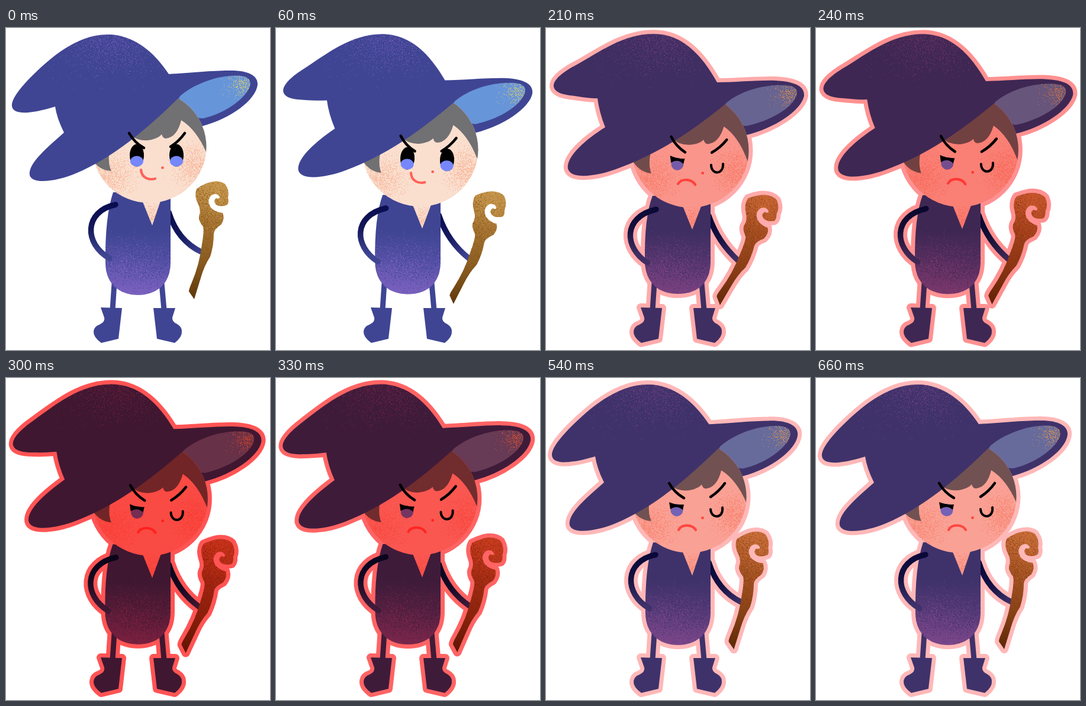
An HTML page with a canvas that plays this animation: 446x545 px, repeating every 690 ms.

```html
<!DOCTYPE html>
<html>
<head>
<meta charset="utf-8">
<style>
html, body { margin: 0; width: 100%; height: 100%; overflow: hidden; background: #fff; }
canvas { display: block; }
</style>
</head>
<body>
<canvas id="stage" width="446" height="545"></canvas>
<script>
const ctx = document.getElementById('stage').getContext('2d');
const LOOP = 690, STEP = 30;
const NAVY = '#3f4593', SKIN = '#fadfcf', HAIR = '#717072', BLUSH = '#f7b99d';
let lean, glow, seed;

// Lean forward quickly, hold, then ease back.
function leanAt(t) {
  if (t < 120) return 1 - (1 - t / 120) ** 2;
  if (t < 210) return 1;
  return Math.max(0, 1 - (t - 210) / 390) ** 2;
}

// Green and blue factor of the red flash.
const flashAt = t => 0.72 - 0.39 * Math.exp(-(((t - 303) / 65) ** 2));

const mix = (a, b) => a + (b - a) * lean;

function ink(hex) {
  const n = parseInt(hex.slice(1), 16);
  return `rgb(${n >> 16},${(n >> 8 & 255) * glow},${(n & 255) * glow})`;
}

function random() {
  seed = (seed * 1664525 + 1013904223) % 4294967296;
  return seed / 4294967296;
}

// Blend two paths that share the same commands.
function morph(a, b) {
  const ends = b.match(/[\d.]+/g);
  let i = 0;
  return new Path2D(a.replace(/[\d.]+/g, n => mix(+n, +ends[i++])));
}

function fill(path, colour) {
  ctx.fillStyle = typeof colour === 'string' ? ink(colour) : colour;
  ctx.fill(path);
}

function line(path, colour, width) {
  ctx.strokeStyle = typeof colour === 'string' ? ink(colour) : colour;
  ctx.lineWidth = width;
  ctx.stroke(path);
}

function gradient(x0, y0, x1, y1, ...colours) {
  const g = ctx.createLinearGradient(x0, y0, x1, y1);
  colours.forEach((c, i) => g.addColorStop(i / (colours.length - 1), ink(c)));
  return g;
}

function ellipse(x, y, rx, ry = rx) {
  const p = new Path2D();
  p.ellipse(x, y, rx, ry, 0, 0, 7);
  return p;
}

function inside(path, draw) {
  ctx.save();
  ctx.clip(path);
  draw();
  ctx.restore();
}

// Grain that thins out away from (x, y).
function grain(path, colour, x, y, sx, sy, count) {
  const bell = () => random() + random() + random() + random() - 2;
  const dots = new Path2D();
  while (count--) dots.rect(Math.round(x + bell() * sx), Math.round(y + bell() * sy), 1, 1);
  inside(path, () => fill(dots, colour));
}

// The face turns a little around the left brow.
function tiltFace() {
  ctx.translate(208 + 3.5 * lean, 178 + 6 * lean);
  ctx.rotate(0.055 * lean);
  ctx.translate(-208, -178);
}

function shapes() {
  const staff = new Path2D();
  staff.addPath(
    new Path2D('M318 459 L309 446 Q309 442 313 433 Q327 400 331 366 Q335 343 333 336 Q325 326 326 319 ' +
      'Q330 309 325 299 Q317 284 322 272 Q331 266 341 262 Q359 256 370 264 Q378 275 375 287 Q377 295 374 299 ' +
      'Q362 304 355 299 Q349 293 355 288 Q361 290 361 286 Q356 278 347 283 Q338 292 346 304 Q354 312 366 313 ' +
      'Q370 322 364 332 Q351 341 351 348 Q351 368 345 387 Q335 402 329 423 Z'),
    new DOMMatrix().translate(330 - 5.5 * lean, 378 + 15 * lean).rotate(13.5 * lean).translate(-330, -378));
  return {
    crown: morph(
      'M275 78 C250 40 215 11 172 11 C118 11 72 53 40 85 C22 104 9 121 10 132 C11 143 27 145 45 142 C60 140 72 136 83 133 Q86 153 98 177 C70 202 37 229 40 249 C44 266 88 259 118 246 C180 220 236 173 294 116 Z',
      'M289 92 C263 45 230 10 182 10 C130 10 90 41 52 62 C27 75 12 88 13 99 C15 110 30 113 48 115 C62 117 72 119 87 119 Q90 143 100 168 C68 188 34 217 37 238 C42 257 85 251 118 239 C185 215 240 180 304 128 Z'),
    brim: morph(
      'M275 78 C310 76 350 72 375 72 C412 71 426 82 425 96 C422 122 380 153 332 166 L260 150 Z',
      'M289 92 C320 92 360 88 388 89 C424 91 437 100 436 115 C431 140 385 170 339 181 L270 165 Z'),
    lining: morph(
      'M292 117 C320 92 365 78 397 81 C416 84 416 96 405 111 C390 130 362 146 333 153 L300 150 Z',
      'M303 128 C330 105 370 95 405 97 C427 99 428 109 417 125 C402 144 370 159 338 166 L305 160 Z'),
    head: ellipse(mix(242, 244), mix(201, 207), mix(96.5, 98.5), mix(95, 97)),
    body: morph(
      'M181 278 Q167 320 168 397 C168 434 193 452 223 452 C253 452 278 434 278 397 L278 280 Z',
      'M180 284 Q166 320 167 395 C168 434 193 450 223 450 C253 450 278 434 278 395 L278 285 Z'),
    collar: morph('M230 292 L247 334 L262 290 Z', 'M230 299 L247 341 L264 297 Z'),
    leftArm: morph('M185 299 C132 310 131 365 175 390', 'M186 307 C129 320 132 372 171 397'),
    rightArm: morph('M275 312 Q290 360 330 379', 'M275 318 Q290 362 325 394'),
    legs: new Path2D('M183 432 L180 477 M263 432 L267 477'),
    boots: new Path2D('M160 473 L196 474 L190 526 L161 533 Q147 523 148 513 Q149 505 158 502 Q168 497 166 490 Z ' +
      'M249 474 L286 474 L281 490 Q280 497 289 501 Q297 506 297 513 Q298 523 285 533 L255 526 Z'),
    staff
  };
}

function drawOutline(s) {
  for (const p of [s.crown, s.brim, s.head, s.body, s.boots, s.staff]) line(p, '#ffffff', 14);
  for (const p of [s.leftArm, s.rightArm, s.legs]) line(p, '#ffffff', 23);
}

function drawBody(s) {
  line(s.legs, NAVY, 9);
  fill(s.boots, NAVY);
  line(s.rightArm, gradient(278, 315, 326, 385, '#080b4e', '#151a60', NAVY), 9.5);
  fill(s.body, gradient(0, 345, 0, 452, NAVY, '#5751a7', '#7b61bf'));
  grain(s.body, '#7b61bf', 200, 425, 70, 50, 3000);
  grain(s.body, NAVY, 245, 390, 60, 45, 1300);
  fill(s.collar, SKIN);
  grain(s.collar, BLUSH, 247, mix(320, 327), 18, 20, 500);
  line(s.leftArm, gradient(178, 300, 165, 385, '#0a0d50', '#131758', NAVY), 9.5);
}

function drawStaff(s) {
  const drop = 16 * lean;
  fill(s.staff, gradient(0, 262 + drop, 0, 455 + drop, '#c2924b', '#a77432', '#8c5d22', '#60390a'));
  grain(s.staff, '#835819', mix(332, 335), 335 + drop, 38, 85, 1300);
  grain(s.staff, '#d0a052', mix(358, 372), 285 + drop, 28, 40, 800);
}

function drawHead(s) {
  fill(s.brim, NAVY);
  fill(s.lining, '#6795d9');
  grain(s.lining, '#cfc57a', mix(410, 421), mix(94, 111), 28, 24, 650);
  fill(s.head, SKIN);
  grain(s.head, BLUSH, mix(176, 180), mix(250, 254), 36, 32, 1600);
  grain(s.head, BLUSH, mix(318, 321), mix(232, 242), 32, 32, 1600);
  inside(s.head, () => {
    tiltFace();
    fill(new Path2D('M296 90 L205 180 L222 188 Q234 192 246 189 Q258 186 263 180 Q265 187 270 187 ' +
      'Q289 185 296 156 Q322 172 339 212 L360 180 L320 90 Z'), HAIR);
    fill(new Path2D('M135 195 L143 219 Q156 241 178 242 Q170 226 177 195 Z'), HAIR);
  });
  fill(s.crown, NAVY);
  grain(s.crown, '#7058b4', mix(178, 193), mix(14, 12), 80, 52, 2600);
}

function drawFace(hurt) {
  ctx.save();
  tiltFace();
  line(new Path2D('M208 178 Q217 194 233 203 M302 178 Q292 192 278 201'), '#000000', 4.5);
  if (hurt) {
    fill(ellipse(221, 223.5, 10.5), '#7587fb');
    fill(new Path2D('M208 210 Q220 215 233 214 L231 223 Q221 214 210 222 Z'), '#000000');
    line(new Path2D('M278 222 C279 239 300 238 298 219'), '#000000', 4);
  } else {
    for (const x of [221, 288]) {
      fill(ellipse(x, 215.5, 12, 19), '#000000');
      fill(ellipse(x, 225.5, 11, 9), '#7587fb');
    }
  }
  fill(ellipse(264.5, 236.5, 2.3), '#ff5a52');
  line(new Path2D(hurt ? 'M224 257 C229 247 247 247 253 257' : 'M228 240 C229 254 242 258 252 255'), '#ff6259', 4.2);
  ctx.restore();
}

function draw(t) {
  const hurt = t >= 165;
  lean = leanAt(t);
  glow = hurt ? flashAt(t) : 1;
  seed = 7;
  ctx.clearRect(0, 0, 446, 545);
  ctx.lineCap = ctx.lineJoin = 'round';
  const s = shapes();
  if (hurt) drawOutline(s);
  drawBody(s);
  drawStaff(s);
  drawHead(s);
  drawFace(hurt);
}

let start, shown;
function tick(now) {
  start ??= now;
  const t = Math.floor((now - start) % LOOP / STEP) * STEP;
  if (t !== shown) draw(shown = t);
  requestAnimationFrame(tick);
}
requestAnimationFrame(tick);
</script>
</body>
</html>
```
